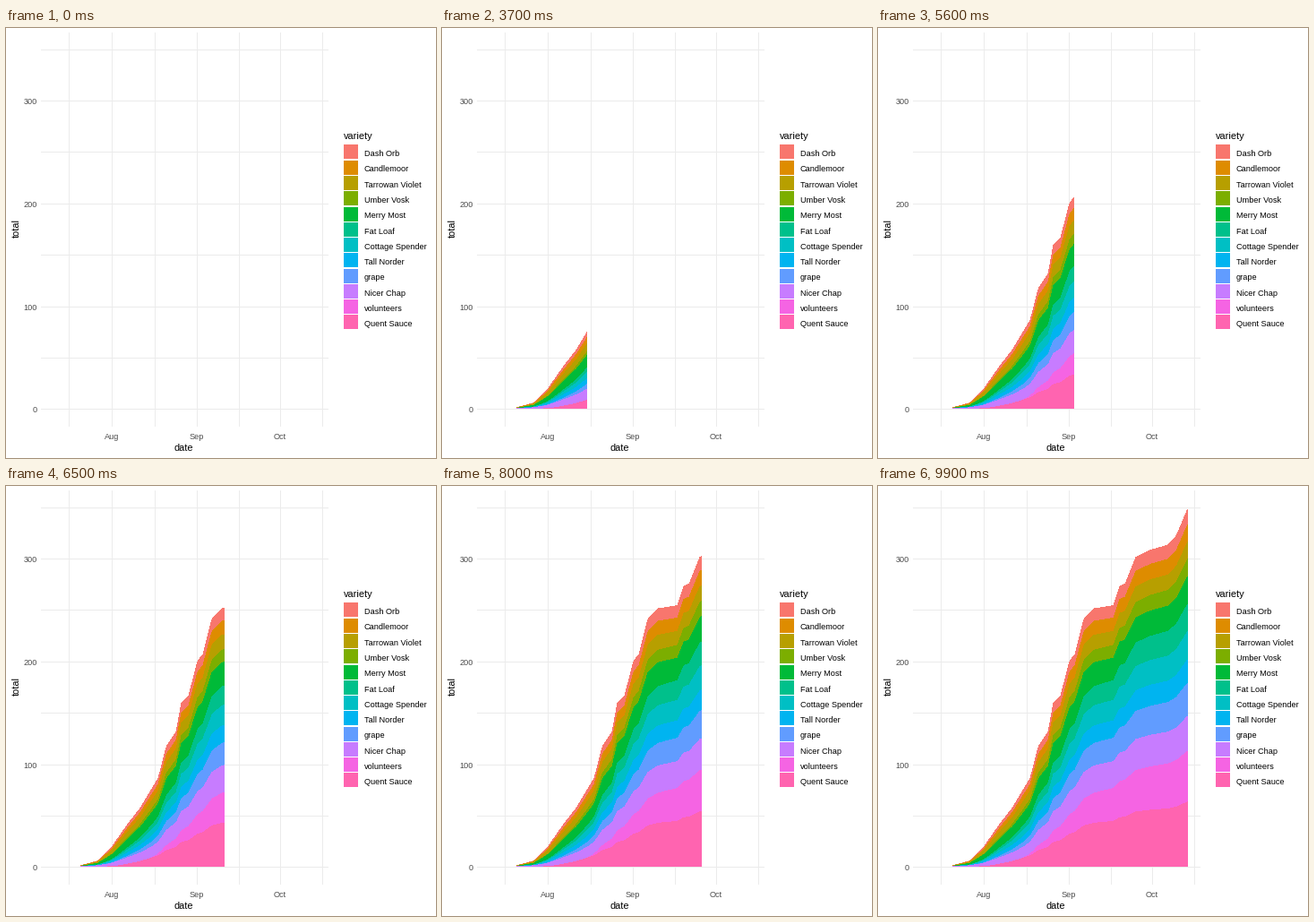
Write a matplotlib script that moves like this. It is 480 px wide and 480 px high and loops after 10000 ms.

```python
import numpy as np
import matplotlib.pyplot as plt
from matplotlib.animation import FuncAnimation
from matplotlib.patches import Polygon, Rectangle

SIZE, DPI = 480, 72
FRAMES, INTERVAL = 100, 100
DAYS, FIRST_DAY = 95, 10
X0, DAY_W = 53.15, 3.078
BASE_Y, UNIT_H = 425, 1.147

plt.rcParams["font.family"] = "Liberation Sans"

# Name, colour, final share in percent, and how far the early share lies from it
VARIETIES = [
    ("Dash Orb", "#F8766D", 4.3, 3),
    ("Candlemoor", "#DE8C00", 4.7, 3.5),
    ("Tarrowan Violet", "#B79F00", 4.6, 6),
    ("Umber Vosk", "#7CAE00", 4.9, 0),
    ("Merry Most", "#00BA38", 7.5, 9),
    ("Fat Loaf", "#00C08B", 7.7, -1.5),
    ("Cottage Spender", "#00BFC4", 7.8, 0),
    ("Tall Norder", "#00B4F0", 6.6, 1),
    ("grape", "#619CFF", 9.3, -3),
    ("Nicer Chap", "#C77CFF", 9.7, 4.5),
    ("volunteers", "#F564E3", 14.5, -15),
    ("Quent Sauce", "#FF64B0", 18.2, -7),
]

# Days on which the pace of the harvest changes, with the total so far
HARVEST = [
    (10, 1), (16, 5.5), (21, 18.5), (27, 41.5), (31.5, 57), (38, 86),
    (41, 117), (44.5, 131), (46.4, 159), (49, 166), (52.3, 200), (54.2, 206.5),
    (57.5, 241), (61, 251), (68.2, 254), (70.5, 273), (72.4, 275),
    (76.3, 301), (81.5, 308), (88, 313), (91, 322), (95, 347.5),
]

fig = plt.figure(figsize=(SIZE / DPI, SIZE / DPI), dpi=DPI, facecolor="white")
ax = fig.add_axes([0, 0, 1, 1])
ax.set_xlim(0, SIZE)
ax.set_ylim(SIZE, 0)
ax.axis("off")


def box(x, y, w, h, color):
    ax.add_patch(Rectangle((x, y), w, h, fc=color, lw=0, antialiased=False))


def label(x, y, text, size=9.1, color="black", ha="left",
          va="center_baseline", **kwargs):
    ax.text(x, y, text, size=size, color=color, ha=ha, va=va, **kwargs)


def draw_axes():
    for k in range(8):
        y = int(425.72 - 50 * UNIT_H * k)
        box(39, y, 321, 1, "#EBEBEB")
        if k % 2 == 0:
            label(34.7, y + 0.3, str(k * 50), color="#4D4D4D", ha="right")
    for x in (70, 118, 166, 213, 260, 306, 353):
        box(x, 5, 1, 440, "#EBEBEB")
    for x, month in ((118, "Aug"), (213, "Sep"), (306, "Oct")):
        label(x, 455.2, month, color="#4D4D4D", ha="center")
    label(198.5, 468.5, "date", 11, ha="center")
    label(11.5, 224, "total", 11, ha="center", va="center", rotation=90)


def draw_legend():
    label(377, 119.8, "variety", 11)
    for k, (name, color, *_) in enumerate(VARIETIES):
        y = 130.4 + 17.28 * k
        box(377, round(y), 16, 16, color)
        label(400, y + 9.2, name)


def layer_edges(days):
    """Pixel heights of the borders between layers, from the top down."""
    final, drift = np.array([v[2:] for v in VARIETIES]).T[:, :, None]
    shares = np.clip(final + drift * np.exp((35 - days) / 16), 0, None)
    below = 1 - np.cumsum(shares, axis=0) / shares.sum(axis=0)
    below = np.vstack([np.ones_like(days), below])
    total = np.interp(days, *np.transpose(HARVEST))
    return BASE_Y - UNIT_H * total * np.clip(below, 0, 1)


draw_axes()
draw_legend()
areas = [ax.add_patch(Polygon([(0, 0), (0, 0), (0, 0)], fc=color, lw=0,
                              antialiased=False, snap=False, visible=False))
         for _, color, *_ in VARIETIES]

# Each day is reached on a whole frame; skipped frames lie in between
day_numbers = np.arange(DAYS + 1)
day_frames = np.round(day_numbers * (FRAMES - 1) / DAYS)


def update(frame):
    today = np.interp(frame, day_frames, day_numbers)
    shown = today > FIRST_DAY
    for area in areas:
        area.set_visible(shown)
    if shown:
        days = np.append(np.arange(FIRST_DAY, today, 0.1), today)
        xs = X0 + DAY_W * days
        xs = np.minimum(xs, round(xs[-1]))
        xs[-1] = round(X0 + DAY_W * today)
        edges = layer_edges(days)
        for area, top, bottom in zip(areas, edges, edges[1:]):
            area.set_xy(np.column_stack([np.append(xs, xs[::-1]),
                                         np.append(top, bottom[::-1])]))
    return areas


anim = FuncAnimation(fig, update, frames=FRAMES, interval=INTERVAL,
                     repeat=True, repeat_delay=0, blit=False)
plt.show()
```
